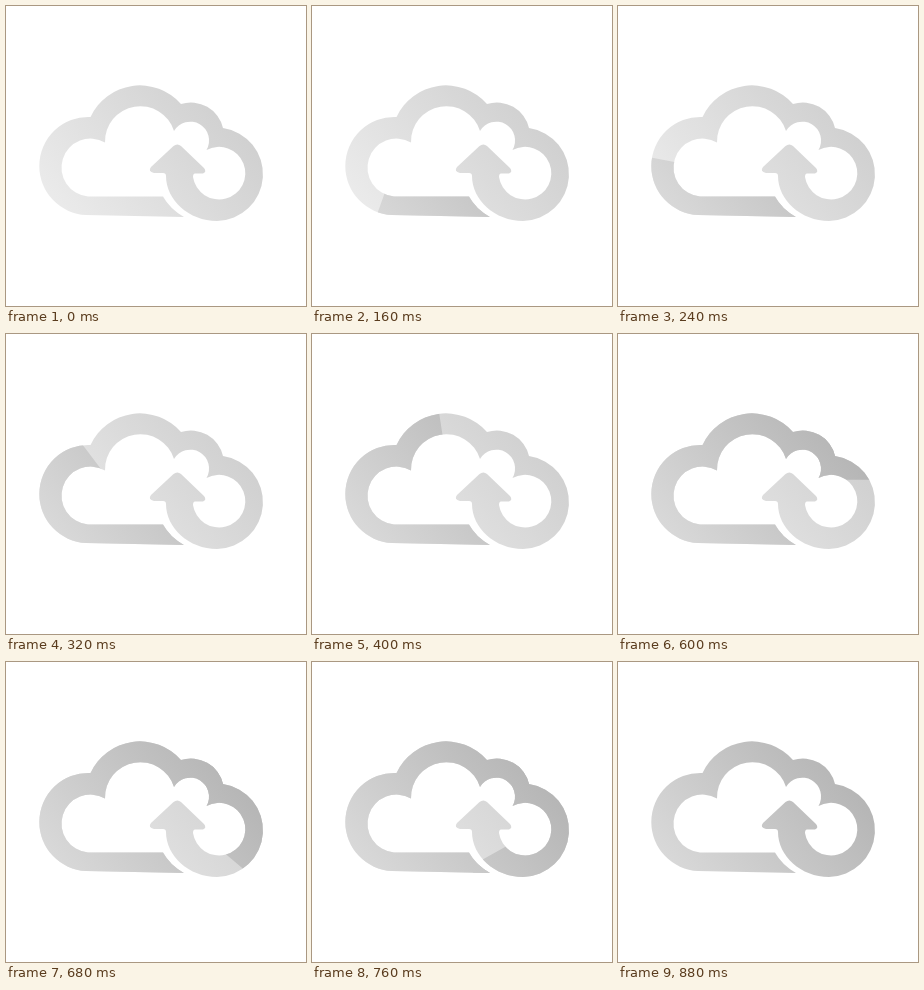
Animation, 300 px wide and 300 px high, one loop 1000 ms. Source, as an HTML page with a canvas:

```html
<!DOCTYPE html>
<html lang="en">
<head>
<meta charset="utf-8">
<title>Cloud upload loader</title>
<style>
  html, body { margin: 0; width: 100%; height: 100%; overflow: hidden; background: #fff; }
  canvas { display: block; width: 100vw; height: 100vh; }
</style>
</head>
<body>
<canvas id="stage" width="300" height="300"></canvas>
<script>
const ctx = document.getElementById('stage').getContext('2d');

const LOOP = 1000, STEP = 40, LAST = 22;
const SPEED = 27.6;      // pixels revealed per step
const RING_START = 364;  // distance at which the arrow ring takes over

const cloud = new Path2D(
  'M178 211 L80 209 A49 49 0 0 1 33.3 160 A49 49 0 0 1 84.5 111' +
  'A54.5 54.5 0 0 1 175 98 A33 33 0 0 1 217 122 A46.75 46.75 0 0 1 211 215' +
  'C183 215 160 194 160 170 Q160 167 157 167 H148 Q141.5 165.5 145 161' +
  'L167.5 140 Q171.3 136.8 175 140 L198 162 Q201 166 197 167.5 H189 Q187 167.5 187 171' +
  'A26.3 26.3 0 1 0 200.5 144 A18.6 18.6 0 0 0 168 125' +
  'A35.3 35.3 0 0 0 99 136.5 A29 29 0 1 0 82 190.5 H157 Q164 203 178 211 Z');

// Everything except the arrow and the ring it grows from
const body = new Path2D(
  'M0 0 H300 V60 L217 122 L200.5 144 L172 135 L141 162 L155 180 L158 190' +
  'L166 202 L180 212 V300 H0 Z');

const bodyTrack = new Path2D(
  'M179 200 H82 A39 39 0 0 1 72 123.3 C84 120 108 89 134 89' +
  'C155 89 162 105 175 109 C186 114 204 113 210 132');

const ringTrack = new Path2D(
  'M198 133 C222 128 238 130 238 142 V168 C238 206 203 224 186 194' +
  'C178 180 173.5 170 173.5 160 V120');

function shade(from, to) {
  const g = ctx.createLinearGradient(60, 215, 215, 85);
  g.addColorStop(0, from);
  g.addColorStop(1, to);
  return g;
}
const light = shade('#ebebeb', '#cfcfcf');
const dark = shade('#d9d9d9', '#b4b4b4');

function reveal(track, length, region) {
  if (length <= 0) return;
  ctx.save();
  ctx.clip(cloud);
  if (region) ctx.clip(region);
  ctx.strokeStyle = dark;
  ctx.lineWidth = 60;
  ctx.setLineDash([length, 2000]);
  ctx.stroke(track);
  ctx.restore();
}

function draw(now) {
  const step = Math.min(LAST, Math.floor((now % LOOP) / STEP));
  const done = step === LAST;
  ctx.fillStyle = '#fff';
  ctx.fillRect(0, 0, 300, 300);
  ctx.fillStyle = done ? dark : light;
  ctx.fill(cloud);
  if (!done) {
    reveal(bodyTrack, step * SPEED, body);
    reveal(ringTrack, step * SPEED - RING_START);
  }
}

const start = performance.now();
function tick() {
  draw(performance.now() - start);
  requestAnimationFrame(tick);
}
tick();
</script>
</body>
</html>
```
